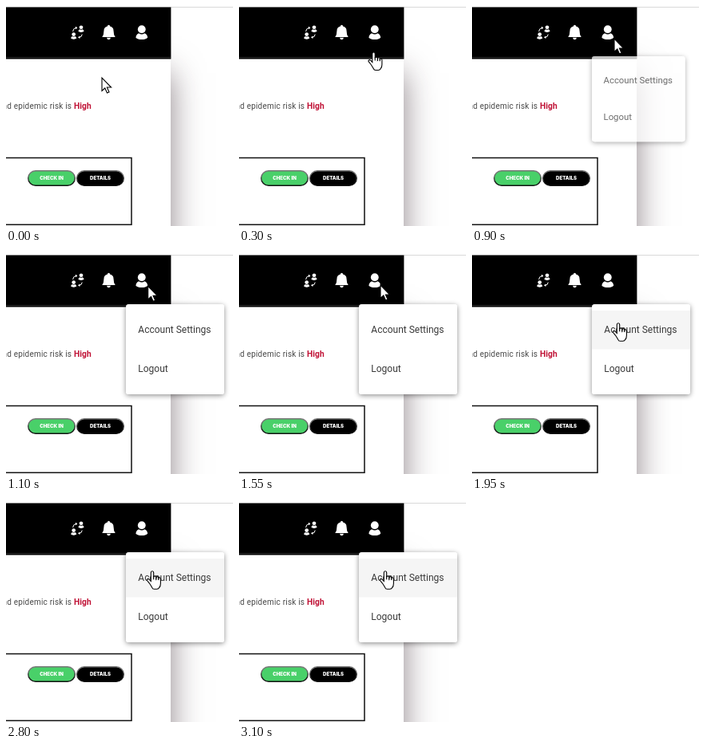
Animation, 284 px wide and 276 px high, one loop 3.15 s. Source, as an HTML page with a canvas:

```html
<!DOCTYPE html>
<html lang="en">
<head>
<meta charset="utf-8">
<title>Account menu</title>
<style>
html, body { margin: 0; width: 100%; height: 100%; overflow: hidden; background: #fff; }
canvas { display: block; }
</style>
</head>
<body>
<canvas id="stage" width="284" height="276"></canvas>
<script>
const ctx = document.getElementById('stage').getContext('2d');
const LOOP = 3150, STEP = 50, OPEN = 850, OPEN_TIME = 130;
const SANS = 'Roboto, Arial, sans-serif';

// time, x, y of the pointer tip
const PATH = [
  [0, 120, 90], [50, 121, 89], [300, 168.5, 58], [450, 178, 41],
  [900, 178, 41], [1550, 177, 39], [1700, 177, 39], [1900, 183, 86.8]
];

const ARROW = new Path2D('M0 0V16.5L3.8 13L6.5 19L9 18L6.4 12H11.6Z');
const HAND = new Path2D('M5.5 13V2.5Q5.5.5 7.2.5Q8.9.5 8.9 2.5V8Q9.1 6.6 10.5 6.6Q12.1 6.6 12.1 8.4' +
  'Q12.4 7.2 13.6 7.3Q15 7.4 15 9Q15.4 8.2 16.4 8.5Q17.6 8.8 17.6 10.4V16Q17.6 19.5 15.8 21.2' +
  'Q15 23 13 23H9.6Q7.6 23 6.8 20.8Q5.5 18.5 3.5 15.5L.8 12.2Q.2 10.8 1.4 10.2Q2.6 9.8 3.6 11Z');
const FINGERS = new Path2D('M8.9 7V11M12.1 8V11.4M15 8.6V11.8');
const BELL = new Path2D('M120.3 39Q122.4 36.5 122.4 31.5Q122.4 25.6 128.5 25.6Q134.6 25.6 134.6 31.5Q134.6 36.5 136.7 39Z');
const SHOULDERS = new Path2D('M-7.4 6.2Q-7 2 -3.6 .8Q0 3.2 3.6 .8Q7 2 7.4 6.2Q5 8.6 0 8.6Q-5 8.6 -7.4 6.2Z');
const SWAP = new Path2D('M83.6 32Q84.2 27.8 87.5 27.4M95.2 35.5Q95 38.8 92 39.2');
const SWAP_TIPS = new Path2D('M87 25.6L89.4 27.4L87 29.2ZM92.4 37.4L90 39.2L92.4 41Z');

function box(x, y, w, h, r, fill, stroke, line) {
  ctx.beginPath();
  ctx.roundRect(x, y, w, h, r);
  ctx.fillStyle = fill;
  ctx.fill();
  if (stroke) {
    ctx.strokeStyle = stroke;
    ctx.lineWidth = line;
    ctx.stroke();
  }
}

function disc(x, y, r, end = Math.PI * 2) {
  ctx.beginPath();
  ctx.arc(x, y, r, 0, end);
  ctx.fill();
}

function text(str, x, y, font, color, align = 'left', spacing = 0) {
  ctx.font = font;
  ctx.fillStyle = color;
  ctx.textAlign = align;
  ctx.letterSpacing = spacing + 'px';
  ctx.fillText(str, x, y);
}

function shadow(color, blur, y) {
  ctx.shadowColor = color;
  ctx.shadowBlur = blur;
  ctx.shadowOffsetY = y;
}

function person(x, y, s) {
  ctx.save();
  ctx.translate(x, y);
  ctx.scale(s, s);
  ctx.fillStyle = '#fff';
  disc(0, -4.3, 4.9);
  ctx.fill(SHOULDERS);
  ctx.restore();
}

function header() {
  ctx.fillStyle = '#d9d9d9';
  ctx.fillRect(0, 1, 284, 1);
  ctx.fillStyle = '#000';
  ctx.fillRect(0, 1.5, 206.4, 65);
  ctx.fillStyle = '#2a2a2a';
  ctx.fillRect(0, 64, 206, 1);

  person(84.7, 37.6, 0.48);
  person(94, 28.8, 0.48);
  ctx.fillStyle = ctx.strokeStyle = '#fff';
  ctx.lineWidth = 1;
  ctx.stroke(SWAP);
  ctx.fill(SWAP_TIPS);

  ctx.fill(BELL);
  disc(128.5, 25.4, 1.6);
  disc(128.5, 39.8, 2.4, Math.PI);
  person(169.8, 33.5, 1);
}

function pill(label, x, w, fill) {
  const edge = ctx.createLinearGradient(0, 206, 0, 226);
  edge.addColorStop(0.2, '#777');
  edge.addColorStop(0.8, '#111');
  box(x + 0.7, 206.7, w - 1.4, 18.6, 9.3, fill, edge, 1.4);
  text(label, x + w / 2, 218.2, '900 6.1px Inter, Arial, sans-serif', '#fff', 'center');
}

function page() {
  ctx.fillStyle = '#fff';
  ctx.fillRect(0, 0, 284, 276);

  // soft shade cast to the right of the page
  ctx.save();
  ctx.beginPath();
  ctx.rect(206, 2, 78, 274);
  ctx.clip();
  shadow('rgba(45,25,35,.54)', 38, 0);
  ctx.fillStyle = '#000';
  ctx.fillRect(-60, 84, 266, 300);
  ctx.restore();

  header();
  text('and epidemic risk is', 82.2, 129, '10px ' + SANS, '#4a4a4a', 'right', 0.2);
  text('High', 85, 129, 'bold 10.2px ' + SANS, '#c01236', 'left', 0.1);

  ctx.strokeStyle = '#111';
  ctx.lineWidth = 1.5;
  ctx.strokeRect(-10, 190.5, 167, 83.8);
  pill('CHECK IN', 27, 60, '#49d069');
  pill('DETAILS', 88, 60, '#000');
}

// cubic-bezier(0, 0, .2, 1)
function easeOut(x) {
  let lo = 0, hi = 1;
  for (let i = 0; i < 20; i++) {
    const m = (lo + hi) / 2;
    if (0.6 * m * m + 0.4 * m * m * m < x) lo = m; else hi = m;
  }
  return lo * lo * (3 - 2 * lo);
}

// shade around the panel only, so the panel stays clear while it fades in
function panelShadow(w, h, r) {
  ctx.save();
  ctx.beginPath();
  ctx.rect(-20, -20, w + 40, h + 40);
  ctx.roundRect(0, 0, w, h, r);
  ctx.clip('evenodd');
  shadow('rgba(0,0,0,.45)', 6, 1.5);
  box(0, 0, w, h, r, '#fff');
  ctx.restore();
}

function menu(p, hover) {
  const s = 0.8 + 0.2 * p;
  ctx.save();
  ctx.globalAlpha = p;
  ctx.translate(150, 63);
  ctx.scale(s, s);
  panelShadow(123, 113, 3.5);
  box(0, 0, 123, 113, 3.5, '#fff');
  if (hover) {
    ctx.fillStyle = '#f5f5f5';
    ctx.fillRect(0, 8, 123, 48.5);
  }
  text('Account Settings', 15.3, 36, '12px ' + SANS, '#3a3a3a');
  text('Logout', 15.3, 84.8, '12px ' + SANS, '#3a3a3a');
  ctx.restore();
}

function pointerAt(t) {
  const i = PATH.findIndex(k => k[0] > t);
  if (i < 0) return PATH[PATH.length - 1].slice(1);
  const [t0, x0, y0] = PATH[i - 1], [t1, x1, y1] = PATH[i];
  const f = (t - t0) / (t1 - t0);
  return [x0 + (x1 - x0) * f, y0 + (y1 - y0) * f];
}

function pointer(x, y, hand) {
  ctx.save();
  ctx.translate(hand ? x - 7.2 : x, hand ? y - 0.5 : y);
  const shape = hand ? HAND : ARROW;
  ctx.fillStyle = '#fff';
  ctx.strokeStyle = '#000';
  ctx.lineWidth = 1.1;
  ctx.fill(shape);
  ctx.stroke(shape);
  if (hand) ctx.stroke(FINGERS);
  ctx.restore();
}

function draw(now) {
  const t = Math.floor((now % LOOP) / STEP) * STEP;
  const [x, y] = pointerAt(t);
  const open = t >= OPEN;
  const hover = open && y > 71;
  page();
  if (t > OPEN) menu(easeOut(Math.min(1, (t - OPEN) / OPEN_TIME)), hover);
  pointer(x, y, hover || (!open && y < 62));
}

const start = performance.now();
function tick() {
  draw(performance.now() - start);
  requestAnimationFrame(tick);
}
tick();
</script>
</body>
</html>
```
